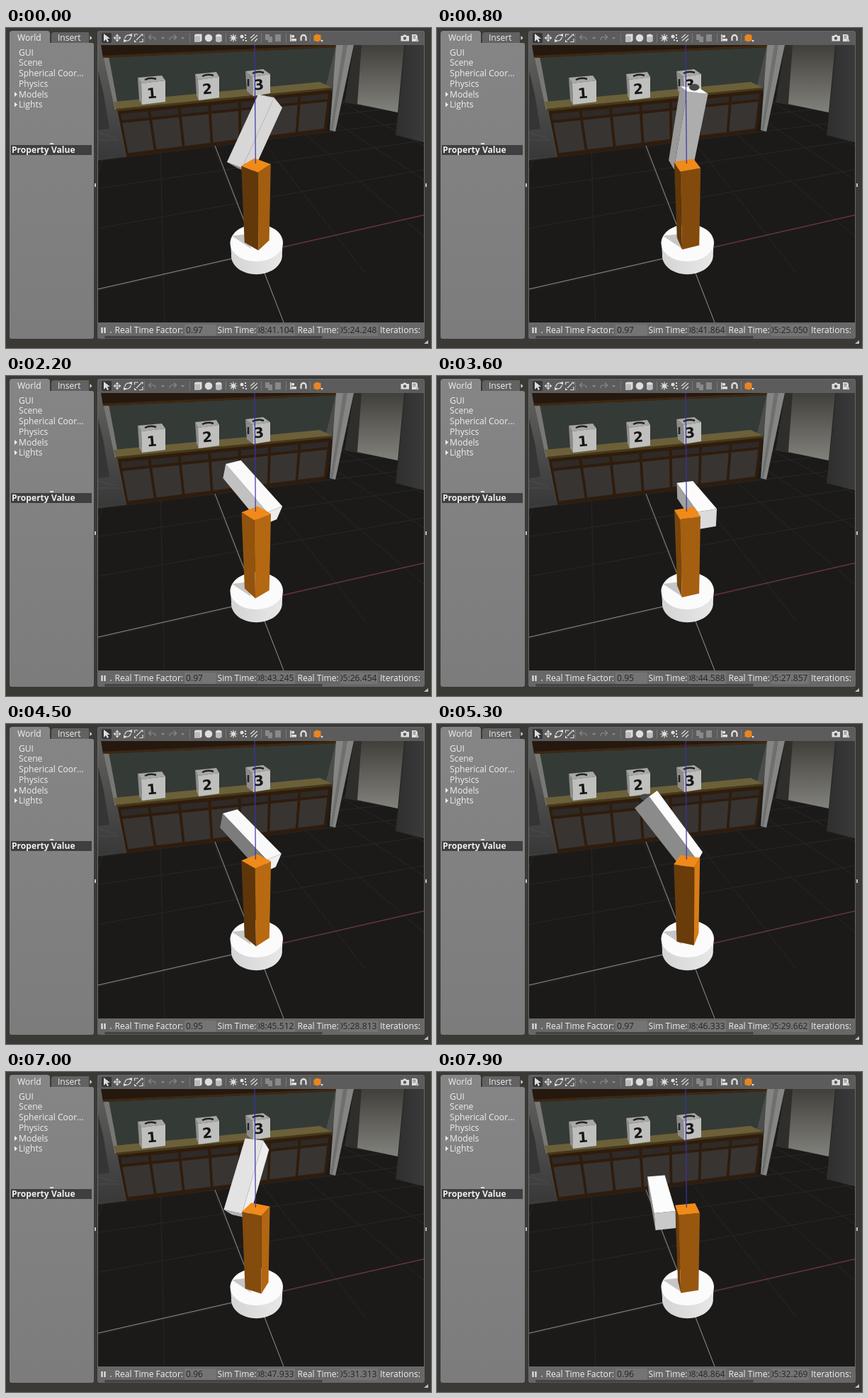
Write an HTML page that moves like this. It is 600 px wide and 451 px high and loops after 8 s.

```html
<!DOCTYPE html>
<html lang="en">
<head>
<meta charset="utf-8">
<title>Robot arm simulation</title>
<style>
  html, body { margin: 0; width: 100%; height: 100%; overflow: hidden; background: #3a3936; }
  svg { display: block; position: absolute; left: 0; top: 0; }
  text { font: 12.1px "Open Sans", "Noto Sans", sans-serif; fill: #f0f0f0; }
  .bold { font-weight: 700; }
  .field { fill: #262626; }
  .end { text-anchor: end; }
  .digit { font: 700 20px "DejaVu Sans", sans-serif; fill: #161616; text-anchor: middle; }
  .icon { fill: #dedede; }
  .line { fill: none; stroke: #dedede; stroke-width: 1.2; }
  .dim { opacity: .35; }
</style>
</head>
<body>
<svg width="600" height="451" viewBox="0 0 600 451">
  <defs>
    <clipPath id="view"><rect x="130" y="24" width="460" height="391"/></clipPath>
    <clipPath id="simClip"><rect x="356" y="418" width="52" height="16"/></clipPath>
    <clipPath id="realClip"><rect x="472.500" y="418" width="52" height="16"/></clipPath>
    <linearGradient id="panel" x2="0" y2="1">
      <stop stop-color="#858585"/><stop offset="1" stop-color="#7c7c7c"/>
    </linearGradient>
    <linearGradient id="side" x2="1" y2="0">
      <stop stop-color="#2e2e2e"/><stop offset="1" stop-color="#3a3a3a"/>
    </linearGradient>
    <linearGradient id="room" x2="0" y2="1">
      <stop stop-color="#413f3a"/><stop offset="1" stop-color="#82827d"/>
    </linearGradient>
    <linearGradient id="jamb" x2="0" y2="1">
      <stop stop-color="#60615f"/><stop offset="1" stop-color="#373837"/>
    </linearGradient>
    <linearGradient id="rim">
      <stop stop-color="#d4d4d4"/><stop offset="1" stop-color="#e8e8e8"/>
    </linearGradient>
  </defs>
  <rect width="600" height="451" fill="#3a3936"/>

  <!-- side panel -->
  <rect x="5" y="21" width="119" height="417" rx="3" fill="url(#panel)"/>
  <path d="M5 26V8q0-4 4-4H58q4 0 4 4V26z" fill="#858585"/>
  <path d="M64 21V10q0-4 4-4H117V21z" fill="#626262"/>
  <path d="M118.500 11l3 3-3 3z" fill="#d8d8d8"/>
  <text x="16" y="18">World</text>
  <text x="73" y="18">Insert</text>
  <text x="18" y="39">GUI</text>
  <text x="18" y="53">Scene</text>
  <text x="18" y="68">Spherical Coor…</text>
  <text x="18" y="83">Physics</text>
  <text x="18" y="98">Models</text>
  <text x="18" y="112">Lights</text>
  <path d="M12 90l4 3.500-4 3.500zM12 104.500l4 3.500-4 3.500z" fill="#eee"/>
  <rect x="62" y="162" width="5" height="2" fill="#ddd"/>
  <rect x="7" y="165" width="114" height="14" fill="#3f3f3f"/>
  <text class="bold" x="8" y="176">Property Value</text>
  <path d="M125 219h2v5h-2zM592 219h2v5h-2zM596 440v5h-6z" fill="#c4c4c4"/>

  <!-- main frame and toolbar -->
  <rect x="129" y="4" width="462" height="434" rx="3" fill="#686868"/>
  <rect x="130" y="5" width="460" height="19" fill="#5c5c5c"/>
  <rect x="135" y="7" width="14" height="14" rx="2" fill="#353535"/>
  <g class="icon">
    <path d="M138 8v11l3-3 2 4 2-1-2-4h4z"/>
    <path d="M157 8.500l2.500 3h-5zM157 19.500l2.500-3h-5zM151.500 14l3-2.500v5zM162.500 14l-3-2.500v5z"/>
    <path d="M174 9l4-1v5zM190 8.500h3.500V12zM170 19l-4 1v-5zM181 16.500v3.500h3.500z"/>
    <path d="M266 10l2-1.500h8.500v9l-2 2H266z"/>
    <circle cx="286" cy="14" r="5.300"/>
    <path d="M296 10q4-3 8.500 0v8.500q-4.500 2.500-8.500 0z"/>
    <circle cx="321" cy="14" r="2.800"/>
    <circle cx="333" cy="12" r="2.500"/>
    <path d="M337 13h2v2h-2zM334 16h2v2h-2zM338 17h2v2h-2zM337 9h2v2h-2z"/>
    <path class="dim" d="M366 9h6v8h-6zM370 12h6v8h-6zM380 9h8v10h-8z"/>
    <path d="M401 9h1.500v10H401zM403 10h4v3.500h-4zM403 15h7v3.500h-7z"/>
    <path d="M557.500 11h3l1-1.500h3l1 1.500h3.500v7.500h-11.500zM573 9h6l2 2v8h-8z"/>
  </g>
  <path d="M266 11.500h8v8h-8zM296 11.500q4 2 8.500 0v7q-4.500 2.500-8.500 0z" fill="#bcbcbc"/>
  <g class="line">
    <path d="M157 10v8M153 14h8M176 11a5 5 0 0 0-8 4M168 17a5 5 0 0 0 8-4M181.500 12.500v-3.500h5M193 15v4.500h-5M184 17l7-7"/>
    <path d="M321 8.500v11M315.500 14h11M317 10l8 8M317 18l8-8M345 14l6-5M346 18l9-8M351 19l4-4"/>
    <path d="M416.500 18v-4.500a3.500 3.500 0 0 1 7 0V18" stroke-width="2.300"/>
    <path class="dim" d="M202 13h6q3 0 3 4M205 9.500l-3.500 3.500 3.500 3.500M240 13h-6q-3 0-3 4M237 9.500l3.500 3.500-3.500 3.500"/>
    <path d="M195.500 7.500v13M259.500 7.500v13M310.500 7.500v13M360.500 7.500v13M395.500 7.500v13M429.500 7.500v13" stroke="#777" stroke-width="1"/>
  </g>
  <path d="M219 13h5l-2.500 3zM247 13h5l-2.500 3z" fill="#8b8b8b"/>
  <path d="M434.500 11l4-2.500 6 1.500v7l-4 2.500-6-1.500z" fill="#e98520"/>
  <path d="M444 17h4l-2 3z" fill="#ddd"/>
  <circle cx="563" cy="14.500" r="2.200" fill="#5c5c5c"/>
  <path d="M574.500 11.500h4M574.500 14h4" stroke="#5c5c5c"/>
  <circle cx="580.500" cy="17.500" r="2" fill="#bbb"/>

  <!-- scene -->
  <g clip-path="url(#view)">
    <rect x="130" y="24" width="460" height="391" fill="#1b1a19"/>
    <g id="grid" stroke="#272726" fill="none"></g>
    <path d="M130 24H470L460 90 172 181 130 186z" fill="#4c4d4b"/>
    <path d="M130 24h8l31 157-39 4z" fill="url(#jamb)"/>
    <path d="M130 60l8 34 8 48-16 2z" fill="#343534"/>
    <path d="M130 148l27 7M130 158l29 0" stroke="#4c4c4b"/>
    <path d="M134 24l13 18 12 64-5 10z" fill="#777874"/>
    <path d="M145 40L466 24 452 80 157 104z" fill="#343a36"/>
    <path d="M134 24H467l-1 3L137 42z" fill="#25190f"/>
    <path d="M137 40.500L466 25.500" stroke="#402711" stroke-width="3"/>
    <path d="M491 24h73l-11 95-75-14z" fill="#2f2e2b"/>
    <path d="M502 24h60l-9 95-57-12z" fill="url(#room)"/>
    <path d="M466 24h25l-26 122-8-2z" fill="#858683"/>
    <path d="M476 24h6l-21 121-3-1z" fill="#6f706d"/>
    <path d="M564 24h26v137l-40-10z" fill="url(#side)"/>
    <path d="M157 115L460 86 452 146 170 182z" fill="#2f1c0c"/>
    <g id="doors"></g>
    <path d="M152 104L443 76 460 84 155 114z" fill="#6b6039"/>
    <path d="M155 114L460 84v3L157 117z" fill="#463817"/>
    <g id="cubes"></g>
    <path d="M130 368L354 317M295 166L392 415" stroke="#92928e" stroke-width="1"/>
    <path d="M354 317L590 263.500" stroke="#83394a"/>
    <g id="robot"></g>
    <path d="M351 24L352.300 191" stroke="#3a34a5" stroke-width="1.200"/>
  </g>

  <!-- status bar -->
  <path d="M134.500 422h2v8h-2zM138.500 422h2v8h-2z" fill="#eee"/>
  <rect x="147" y="428" width="2" height="2" fill="#aaa"/>
  <path d="M252 418h45v16h-45zM355 418h53v16h-53zM472 418h53v16h-53z" fill="#747474"/>
  <text x="153.500" y="430">Real Time Factor:</text>
  <text x="298.500" y="430">Sim Time:</text>
  <text x="411.500" y="430">Real Time:</text>
  <text x="528" y="430">Iterations:</text>
  <text class="field" id="rate" x="254" y="430"></text>
  <g clip-path="url(#simClip)"><text class="field end" id="sim" x="406.500" y="430"></text></g>
  <g clip-path="url(#realClip)"><text class="field end" id="real" x="523.500" y="430"></text></g>
  <rect x="139" y="434" width="308" height="3.500" rx="1.700" fill="#444"/>
</svg>
<script>
const $ = id => document.getElementById(id);
const rad = Math.PI / 180;

// Vectors: x right, y away, z up; the origin is on top of the base.
const add = (...vs) => [0, 1, 2].map(i => vs.reduce((s, v) => s + v[i], 0));
const mul = (v, k) => v.map(c => c * k);
const dot = (a, b) => a[0] * b[0] + a[1] * b[1] + a[2] * b[2];

const eye = [0.24, -11.3, 10.75], focal = 399;
const tiltCos = Math.cos(32 * rad), tiltSin = Math.sin(32 * rad);

function project(p) {
  const [x, y, z] = add(p, mul(eye, -1));
  const depth = y * tiltCos - z * tiltSin;
  const k = focal / depth;
  return [360 + x * k, 219 - (z * tiltCos + y * tiltSin) * k, k];
}
const flat = p => p.slice(0, 2).map(c => c.toFixed(1)).join();
const poly = (pts, fill) => `<polygon points="${pts.map(flat).join(' ')}" fill="${fill}"/>`;
const mix = (a, b, k) => a + (b - a) * k;

function drawGrid() {
  const c = Math.cos(17.3 * rad), s = Math.sin(17.3 * rad);
  const at = (a, b) => project([a * c - b * s, a * s + b * c, -0.95]);
  let out = '';
  const segment = (p, q) => { out += `<path d="M${flat(p)}L${flat(q)}"/>`; };
  for (let i = -6; i <= 8; i++) {
    segment(at(i * 5, -3), at(i * 5, 40));
    if (i > -1) segment(at(-30, i * 5), at(40, i * 5));
  }
  $('grid').innerHTML = out;
}

function drawDoors() {
  const at = (u, v) => [
    mix(mix(157, 460, u), mix(170, 452, u), v),
    mix(mix(115, 86, u), mix(182, 146, u), v)
  ];
  const panel = (u, w, top, bottom, fill) =>
    poly([at(u, top), at(u + w, top), at(u + w, bottom), at(u, bottom)], fill);
  let out = '';
  for (let i = 0; i < 7; i++) {
    const u = 0.012 + i * 0.141;
    out += panel(u, 0.128, 0.1, 0.23, '#2f2a27') + panel(u, 0.128, 0.29, 0.92, '#383432');
  }
  $('doors').innerHTML = out;
}

function cube(x, y, w, h, skew, n) {
  const f = skew + 1;
  return poly([[x, y], [x + w - f, y - 3], [x + w, y + 4], [x + f, y + 8]], '#a8a8a6') +
    poly([[x, y], [x + f, y + 8], [x + f + 1, y + h], [x + 2, y + h - 7]], '#8c8c8a') +
    poly([[x + f, y + 8], [x + w, y + 4], [x + w, y + h - 4], [x + f + 1, y + h]], '#bfbfbd') +
    `<path d="M${x + 10} ${y + 3}q8-4 16-1" fill="none" stroke="#222" stroke-width="2.500"/>` +
    `<text class="digit" transform="translate(${x + w / 2 + skew / 4} ${y + h - 9}) rotate(-5)">${n}</text>`;
}

function drawCubes() {
  $('cubes').innerHTML = cube(186, 70, 39, 38, 4, 1) + cube(267, 65, 34, 37, 3, 2) +
    cube(338, 61, 35, 35, 9, 3) +
    '<path d="M342 72v10" stroke="#222" stroke-width="2.500"/>';
}

function drawBase() {
  const radius = 1.42, rim = [], foot = [];
  for (let i = 0; i < 60; i++) {
    const x = radius * Math.cos(i * 6 * rad), y = radius * Math.sin(i * 6 * rad);
    rim.push(project([x, y, 0]));
    foot.push(project([x, y, -0.95]));
  }
  return poly([rim[30], ...foot.slice(30), foot[0], rim[0]], 'url(#rim)') + poly(rim, '#fbfbfb') +
    poly([[319, 293], [340, 290.5], [346, 311]], '#c6c6c6');
}

// Visible faces of a box, lit from the left, right and above.
function box(o, axes, color, light, sideGain) {
  let out = '';
  axes.forEach((axis, i) => {
    const p = axes[(i + 1) % 3], q = axes[(i + 2) % 3];
    for (const sign of [1, -1]) {
      const normal = mul(axis, sign), mid = add(o, normal);
      if (dot(normal, add(mid, mul(eye, -1))) >= 0) continue;
      const size = Math.hypot(...normal);
      const up = Math.max(0, normal[2] / size);
      const side = mix(light[0], light[1], (normal[0] / size + 1) / 2) * sideGain;
      const shade = Math.min(1, mix(side, 1, up));
      const corners = [[1, 1], [1, -1], [-1, -1], [-1, 1]]
        .map(([a, b]) => project(add(mid, mul(p, a), mul(q, b))));
      out += poly(corners, `rgb(${color.map(c => Math.round(c * shade))})`);
    }
  });
  return out;
}

const height = 4.67, reach = 3.6, half = 0.475;

function drawRobot(yaw, pitch, light) {
  const c = Math.cos(yaw * rad), s = Math.sin(yaw * rad);
  const cp = Math.cos(pitch * rad), sp = Math.sin(pitch * rad);
  const u = [c, s, 0], v = [s, -c, 0];
  const along = [v[0] * sp, v[1] * sp, cp];
  const across = [v[0] * cp, v[1] * cp, -sp];
  const joint = add(u, [0, 0, height - 0.5]);

  const column = box([0.02, 0, height / 2], [mul(u, half), mul(v, half), [0, 0, height / 2]],
    [240, 138, 24], light, 0.83);
  let arm = box(add(joint, mul(along, reach / 2)),
    [mul(u, half), mul(across, half), mul(along, reach / 2)], [252, 252, 252], light, 1.05);

  // Dome on the end of the arm.
  const tip = add(joint, mul(along, reach + 0.08));
  const [x, y, k] = project(tip);
  const knob = `<ellipse cx="${x.toFixed(1)}" cy="${(y - 1).toFixed(1)}" ` +
    `rx="${(0.22 * k).toFixed(1)}" ry="${(0.15 * k).toFixed(1)}" fill="#474747"/>`;
  const tipSeen = dot(along, add(tip, mul(eye, -1))) < 0;
  arm = tipSeen ? arm + knob : knob + arm;
  $('robot').innerHTML = base + (s > 0 ? arm + column : column + arm);
}

// time, yaw, pitch, left light, right light, sim seconds, real seconds, rate
const keys = [
  [0, 142, 42, 0.4, 0.86, 41.104, 24.248, 0.97],
  [800, 109, 11, 0.48, 0.74, 41.864, 25.05, 0.97],
  [2200, 39, -67, 0.7, 0.95, 43.245, 26.454, 0.97],
  [3600, 18, -90, 0.6, 0.95, 44.588, 27.857, 0.95],
  [5300, 74, -38, 0.2, 1.1, 46.333, 29.662, 0.97],
  [6200, 122, 3, 0.55, 0.92, 47.106, 30.464, 0.96],
  [7900, 192, 85, 0.55, 0.9, 48.864, 32.269, 0.96]
];

function slope(i, col) {
  const a = keys[Math.max(0, i - 1)], b = keys[Math.min(keys.length - 1, i + 1)];
  return (b[col] - a[col]) / (b[0] - a[0]);
}

function show(t) {
  let i = 0;
  while (i < keys.length - 2 && t >= keys[i + 1][0]) i++;
  const a = keys[i], b = keys[i + 1], span = b[0] - a[0], k = (t - a[0]) / span;
  const line = col => mix(a[col], b[col], k);
  const curve = col => {
    const k2 = k * k, k3 = k2 * k;
    return mix(a[col], b[col], 3 * k2 - 2 * k3) +
      span * ((k3 - 2 * k2 + k) * slope(i, col) + (k3 - k2) * slope(i + 1, col));
  };
  drawRobot(curve(1), curve(2), [line(3), line(4)]);
  $('sim').textContent = '08:' + line(5).toFixed(3);
  $('real').textContent = '05:' + line(6).toFixed(3);
  $('rate').textContent = (k < 1 ? a : b)[7].toFixed(2);
}

drawGrid();
drawDoors();
drawCubes();
const base = drawBase();

const start = performance.now();
let last = -1;
function tick(now) {
  const t = Math.floor(Math.max(0, now - start) % 8000 / 100) * 100;
  if (t !== last) show(last = t);
  requestAnimationFrame(tick);
}
show(0);
requestAnimationFrame(tick);
</script>
</body>
</html>
```
